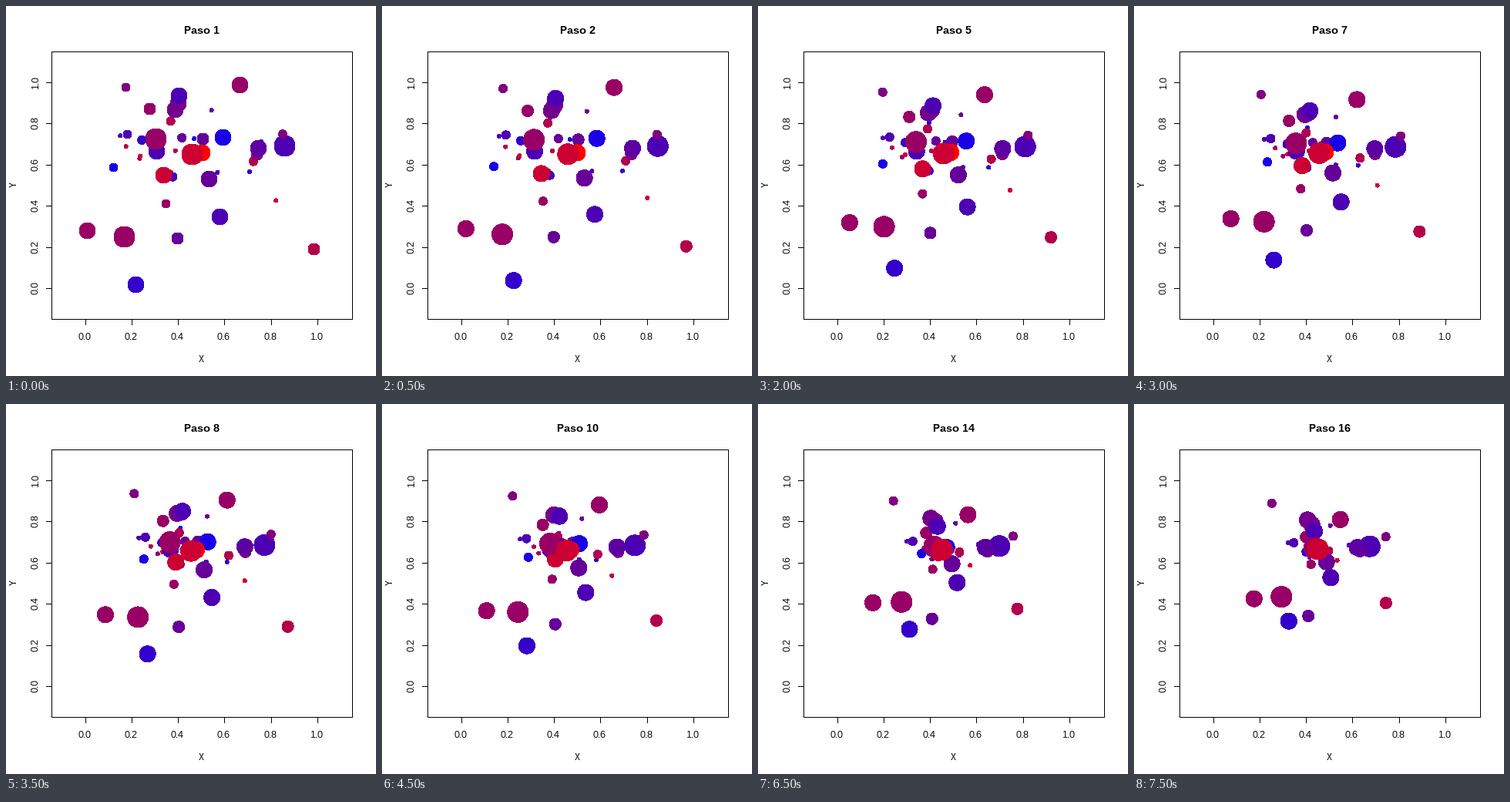
Recreate the animation shown at these times as a matplotlib script. Size 480 by 480 pixels, loop 8000 ms.

```python
import math
import random

import matplotlib.pyplot as plt
from matplotlib.animation import FuncAnimation
from matplotlib.patches import Circle

SIZE, DPI, STEPS = 480, 80, 16
PX = 72 / DPI
FOCUS = 238, 188
R_TINY, R_SMALL, R_MID, R_LARGE, R_HUGE = 2.5, 5.5, 7.5, 10.5, 13.5
plt.rcParams.update({
    "font.family": "Liberation Sans",
    "text.hinting": "default",
    "text.hinting_factor": 1,
})

# Key dots as (x, y, charge); charge 0 is blue, 1 is red.
BACK = [(153, 299, 0.6), (361, 181, 0.3)]
SMALL = [(155, 105, 0.5), (139, 209, 0.1), (207, 256, 0.6), (157, 166, 0.3)]
MID = [(186, 133, 0.6), (222, 301, 0.4), (399, 315, 0.7), (255, 172, 0.4),
       (325, 192, 0.5)]
LARGE = [(277, 273, 0.3), (105, 291, 0.6), (168, 361, 0.2), (195, 188, 0.3),
         (303, 102, 0.6), (281, 170, 0.1), (327, 184, 0.36), (263, 224, 0.4),
         (223, 126, 0.5), (219, 134, 0.45), (224, 116, 0.3), (254, 190, 1),
         (204, 219, 0.8)]
HUGE = [(194, 172, 0.6), (241, 192, 0.8)]


def scatter(rng, count):
    """Minor dots spread around the focus."""
    return [(rng.gauss(FOCUS[0], 45), rng.gauss(FOCUS[1], 40),
             rng.randint(1, 8) / 10) for _ in range(count)]


def position(u, x, y, charge):
    """Steady drift to the focus; stronger charges travel further."""
    dx, dy = FOCUS[0] - x, FOCUS[1] - y
    reach = 14 + 330 * abs(charge - 0.44)
    pull = u * math.tanh(reach / math.hypot(dx, dy))
    return x + 0.5 + dx * pull, y + 0.5 + dy * pull


fig = plt.figure(figsize=(SIZE / DPI, SIZE / DPI), dpi=DPI, facecolor="white")
ax = fig.add_axes([0, 0, 1, 1])
ax.set(xlim=(0, SIZE), ylim=(SIZE, 0))
ax.axis("off")


def line(xs, ys):
    ax.plot(xs, ys, color="black", lw=PX, solid_capstyle="projecting",
            snap=False, zorder=1)


def label(x, y, text, size=12, ha="center", va="baseline", **kw):
    return ax.text(x, y, text, fontsize=size * PX, ha=ha, va=va, **kw)


LEFT, RIGHT, TOP, BOTTOM = 59.5, 449.5, 59.5, 406.5
line([LEFT, RIGHT, RIGHT, LEFT, LEFT], [TOP, TOP, BOTTOM, BOTTOM, TOP])
for i in range(6):
    tx = int(103 + 60.3 * i) + 0.5
    ty = int(366.9 - 53.56 * i) + 0.5
    line([tx, tx], [BOTTOM, BOTTOM + 7])
    line([LEFT - 7, LEFT], [ty, ty])
    label(tx - 1, 433, f"{i / 5:.1f}")
    label(44, ty - 1, f"{i / 5:.1f}", rotation=90, ha="right", va="center")
label(253, 462, "X")
label(10.5, 231.5, "Y", rotation=90, va="center")
title = label(254, 36, "", 14, weight="bold")

rng = random.Random(12)
layers = [
    (R_HUGE, BACK), (R_TINY, scatter(rng, 15)), (R_SMALL, scatter(rng, 7)),
    (R_SMALL, SMALL), (R_MID, MID), (R_LARGE, LARGE), (R_HUGE, HUGE),
]
dots = []
for radius, keys in layers:
    for key in keys:
        charge = key[2]
        dot = Circle(key[:2], radius, color=(charge, 0, 1 - charge), lw=0,
                     antialiased=False, zorder=2 + len(dots) / 100)
        dots.append((ax.add_patch(dot), key))


def update(step):
    title.set_text(f"Paso {step + 1}")
    for dot, key in dots:
        dot.center = position(step / (STEPS - 1), *key)
    return [title, *(dot for dot, _ in dots)]


anim = FuncAnimation(fig, update, frames=STEPS, interval=500, repeat=True,
                     repeat_delay=0)
plt.show()
```
